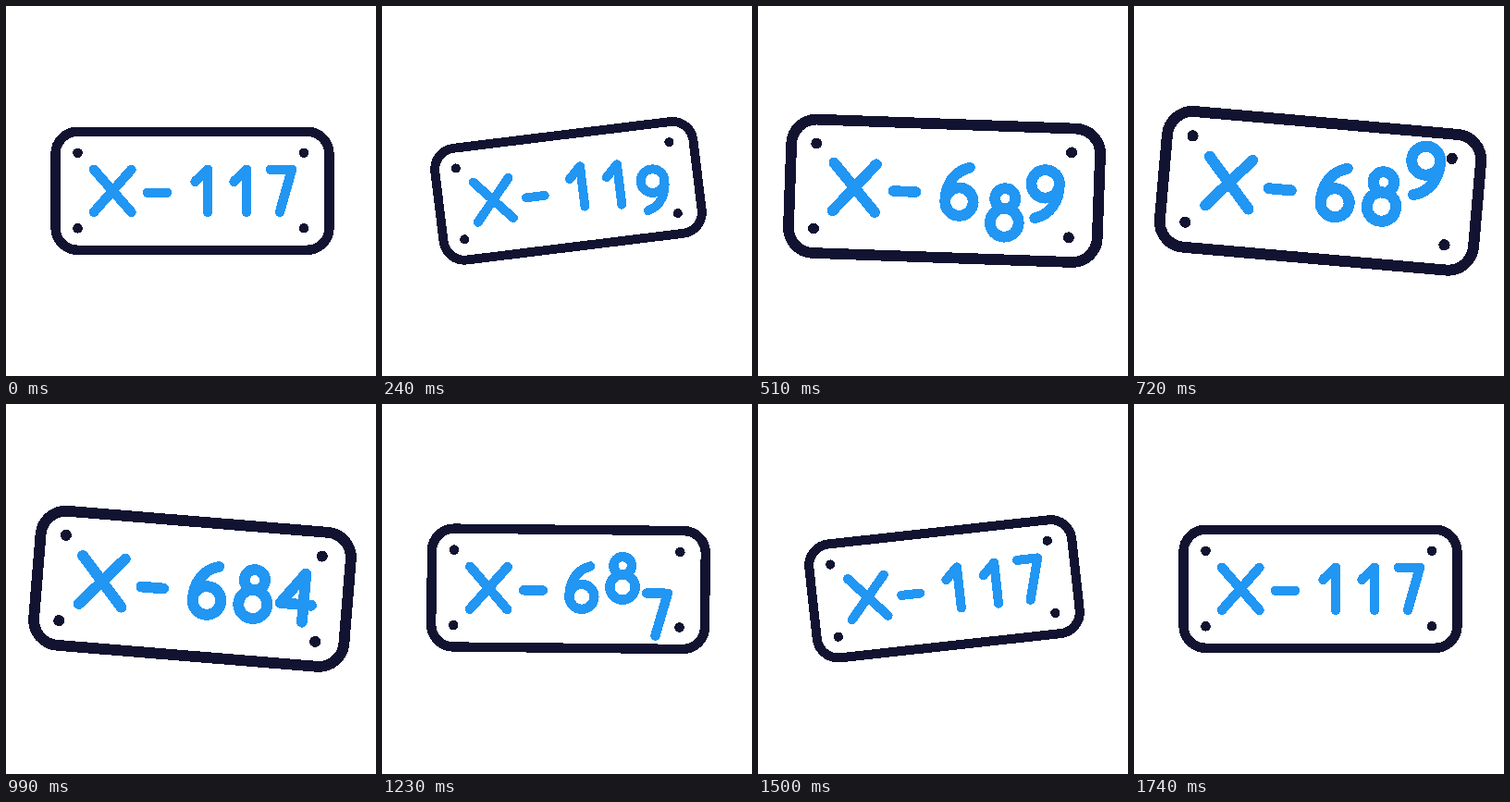
An HTML page for the animation above (4270 ms loop, 400 by 400 pixels).

```html
<!DOCTYPE html>
<html lang="en">
<head>
<meta charset="utf-8">
<title>Number plate</title>
<style>
  html, body { margin: 0; width: 100%; height: 100%; overflow: hidden; background: #fff; }
  svg { display: block; width: 100vw; height: 100vh; shape-rendering: crispEdges; }
  path, rect { fill: none; stroke-width: 10.4; stroke-linecap: round; stroke-linejoin: round; }
  path { stroke: #2196f3; }
  rect { stroke: #121331; }
  circle { fill: #121331; }
</style>
</head>
<body>
<svg viewBox="0 0 400 400">
  <g id="plate">
    <rect x="53.5" y="136" width="296" height="128" rx="24"/>
    <circle cx="77.5" cy="159" r="5.3"/>
    <circle cx="322" cy="159" r="5.3"/>
    <circle cx="77.5" cy="240.5" r="5.3"/>
    <circle cx="322" cy="240.5" r="5.3"/>
    <path d="M95 177L135.500 223M135.500 177L95 223M153 202H174"/>
    <path class="digit"/>
    <path class="digit"/>
    <path class="digit"/>
  </g>
</svg>
<script>
const LOOP = 4270, STEP = 30, LAST = 58;
const TRAVEL = 30, HALF = 5; // digit roll: distance and steps per half

// Glyphs are drawn around the middle of their slot.
const GLYPHS = {
  1: 'M-13.500 -10L0 -23V23',
  4: 'M8.500 -23L-13.500 6.500H16M8.500 -23V23',
  6: 'M7 -23C-8 -19 -15.500 -6 -15.500 10a13.500 13.500 0 1 0 27 0a13.500 13.500 0 1 0 -27 0',
  7: 'M-13.500 -23H9.500L-3.500 23',
  8: 'M0 -23a9.800 9.800 0 1 0 0 19.600a9.800 9.800 0 1 0 0 -19.600M0 -3.800a13.700 13.700 0 1 0 0 27.400a13.700 13.700 0 1 0 0 -27.400',
  9: 'M-10.500 23C4.500 19 12 6 12 -10a13.500 13.500 0 1 0 -27 0a13.500 13.500 0 1 0 27 0'
};

// Each roll: [start step, new digit]
const SLOTS = [
  { x: 218, first: 1, rolls: [[7, 6], [40.3, 1]] },
  { x: 260, first: 1, rolls: [[9.9, 8], [38.8, 1]] },
  { x: 299.5, first: 7, rolls: [[0, 9], [20, 4], [35, 7]] }
];

// Keys: [step, value, ease into this key (x1, x2)]
const TURN = [[0, 0], [8, -7], [21.3, 5], [30, 5], [48, -7, .6, .95], [58, 0]];
const SCALE = [[0, 1], [8, .95], [19.3, 1.15], [30, 1.15], [46, .95, .42, .65], [57, 1]];

const smooth = t => t * t * (3 - 2 * t);

// Ease with flat ends, cubic-bezier(x1, 0, x2, 1)
function ease(p, x1 = 1 / 3, x2 = 2 / 3) {
  let lo = 0, hi = 1;
  for (let i = 0; i < 24; i++) {
    const t = (lo + hi) / 2, u = 1 - t;
    if (3 * u * u * t * x1 + 3 * u * t * t * x2 + t * t * t < p) lo = t;
    else hi = t;
  }
  return smooth(lo);
}

function track(keys, n) {
  const i = keys.findIndex(k => k[0] > n);
  if (i < 0) return keys[keys.length - 1][1];
  const [n0, v0] = keys[i - 1], [n1, v1, x1, x2] = keys[i];
  return v0 + (v1 - v0) * ease((n - n0) / (n1 - n0), x1, x2);
}

// The old digit rises and is cut, the new one comes up from below.
function digitAt(slot, n) {
  let digit = slot.first, dy = 0;
  for (const [start, next] of slot.rolls) {
    const p = (n - start) / HALF;
    if (p < 0) break;
    if (p < 1) {
      dy = -TRAVEL * smooth(p);
    } else {
      digit = next;
      dy = TRAVEL * (1 - smooth(Math.min(p - 1, 1)));
    }
  }
  return { digit, dy };
}

const plate = document.getElementById('plate');
const digits = document.querySelectorAll('.digit');

function draw(ms) {
  const n = Math.min(LAST, Math.floor((ms % LOOP) / STEP));
  plate.setAttribute('transform',
    `translate(201.5 199.800) rotate(${track(TURN, n)}) scale(${track(SCALE, n)}) translate(-201.5 -200)`);
  SLOTS.forEach((slot, i) => {
    const { digit, dy } = digitAt(slot, n);
    digits[i].setAttribute('d', GLYPHS[digit]);
    digits[i].setAttribute('transform', `translate(${slot.x} ${200 + dy})`);
  });
}

const begin = performance.now();
function tick() {
  draw(performance.now() - begin);
  requestAnimationFrame(tick);
}
tick();
</script>
</body>
</html>
```
